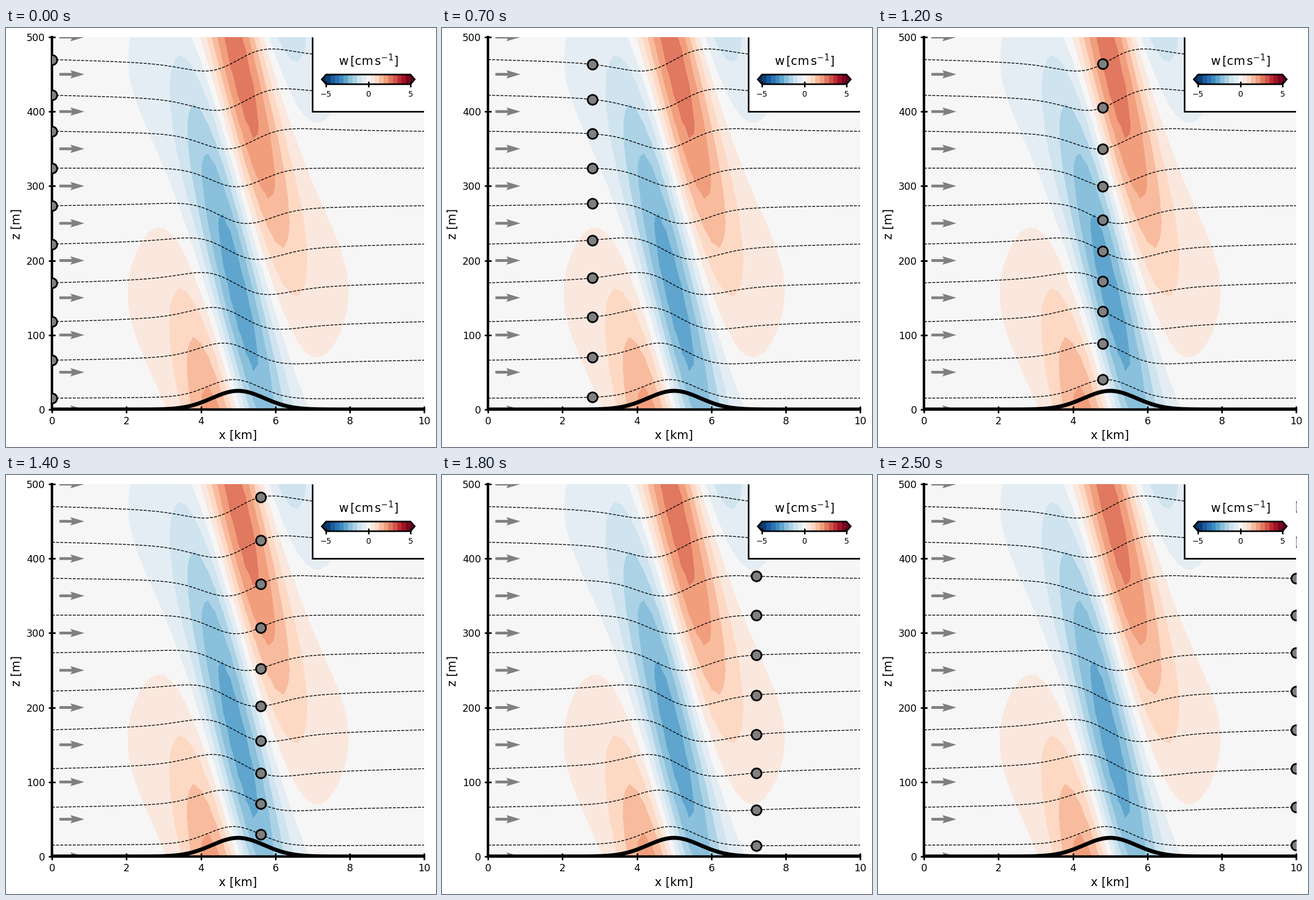
Recreate the animation shown at these times as a matplotlib script. Size 758 px wide and 738 px high, loop 2.6 s.

```python
import numpy as np
import matplotlib.pyplot as plt
from matplotlib.animation import FuncAnimation
from matplotlib.patches import Rectangle

W, H, DPI = 758, 738, 125
FRAMES, INTERVAL = 26, 100
LENGTH, CENTER = 10.0, 5.0        # km
HILL = 25.0                       # m
SCORER = 0.01                     # N / U in 1/m
X_STEP = 0.4                      # km travelled per frame

plt.rcParams.update({"font.family": "DejaVu Sans", "mathtext.fontset": "dejavusans"})


def hill(x):
    return HILL * np.exp(-(x - CENTER) ** 2)


def displacement(x, z):
    """Linear hydrostatic mountain wave over a periodic Gaussian ridge."""
    x = np.asarray(x, dtype=float)
    mean = HILL * np.sqrt(np.pi) / LENGTH
    wave = np.zeros(x.shape, dtype=complex)
    for n in range(1, 26):
        k = 2 * np.pi * n / LENGTH
        wave += 2 * mean * np.exp(-k * k / 4) * np.exp(1j * k * (x - CENTER))
    return mean + (wave * np.exp(1j * SCORER * z)).real


def streamline(x, level):
    return level + displacement(np.asarray(x) + 0.035, level)


def px_box(left, top, right, bottom):
    return [left / W, 1 - bottom / H, (right - left) / W, (bottom - top) / H]


def px_text(x, y, text, **kw):
    fig.text(x / W, 1 - y / H, text, fontsize=12, ha="center", **kw)


fig = plt.figure(figsize=(W / DPI, H / DPI), dpi=DPI, facecolor="white")
ax = fig.add_axes(px_box(81, 16, 737.4, 671.9))
ax.set(xlim=(0, 10), ylim=(0, 500))

# vertical velocity in cm/s for a wind of 1 m/s
gx, gz = np.meshgrid(np.linspace(0, 10, 51), np.linspace(0, 500, 51))
w = 100 * np.gradient(displacement(gx, gz), 200, axis=1)
field = ax.contourf(gx, gz, w, levels=np.linspace(-5, 5, 20), cmap="RdBu_r",
                    extend="both", zorder=0)

rows = np.arange(0, 501, 50)
ax.quiver(np.full(rows.size, 0.2), rows, np.full(rows.size, 44.0), np.zeros(rows.size),
          color="gray", units="dots", width=4.9, scale_units="dots", scale=1, zorder=2)

levels = 15.2 + 50 * np.arange(10)
xs = np.linspace(0, 10, 401)
for level in levels:
    ax.plot(xs, streamline(xs, level), "k--", lw=0.8, zorder=3)
ax.plot(xs, hill(xs), "k", lw=4, zorder=4)

dots, = ax.plot([], [], "o", ms=10, mfc="gray", mec="black", mew=1.7, zorder=5)

# legend panel
ax.add_patch(Rectangle((7, 400), 3, 100, fc="white", lw=0, snap=False, zorder=6))
ax.plot([7, 7, 10], [500, 400, 400], "k", lw=1.6, zorder=7,
        solid_joinstyle="miter", solid_capstyle="butt")

cax = fig.add_axes(px_box(556.7, 82, 720.5, 99))
bar = fig.colorbar(field, cax=cax, orientation="horizontal", extendfrac=0.05,
                   ticks=[-5, 0, 5])
bar.minorticks_off()
bar.outline.set_linewidth(1.6)
cax.tick_params(direction="inout", length=6, width=1.5, labelsize=8, pad=3.5)
px_text(638.7, 66.5, r"$\mathrm{w\,[cm\,s^{-1}]}$", va="baseline")

for side in ("top", "right"):
    ax.spines[side].set_visible(False)
for side in ("left", "bottom"):
    ax.spines[side].set_linewidth(2.5)
    ax.spines[side].set_zorder(4)
ax.set_xticks(range(0, 11, 2))
ax.set_yticks(range(0, 501, 100))
ax.tick_params(direction="inout", length=7, width=1.6, labelsize=10, pad=3.5)
px_text(409, 717.7, "x [km]", va="center")
px_text(18.6, 345, "z [m]", va="center", rotation=90)


def update(frame):
    x = frame * X_STEP
    dots.set_data(np.full(levels.size, x), [float(streamline(x, z)) for z in levels])
    return dots,


anim = FuncAnimation(fig, update, frames=FRAMES, interval=INTERVAL,
                     repeat=True, repeat_delay=0, blit=False)
plt.show()
```
